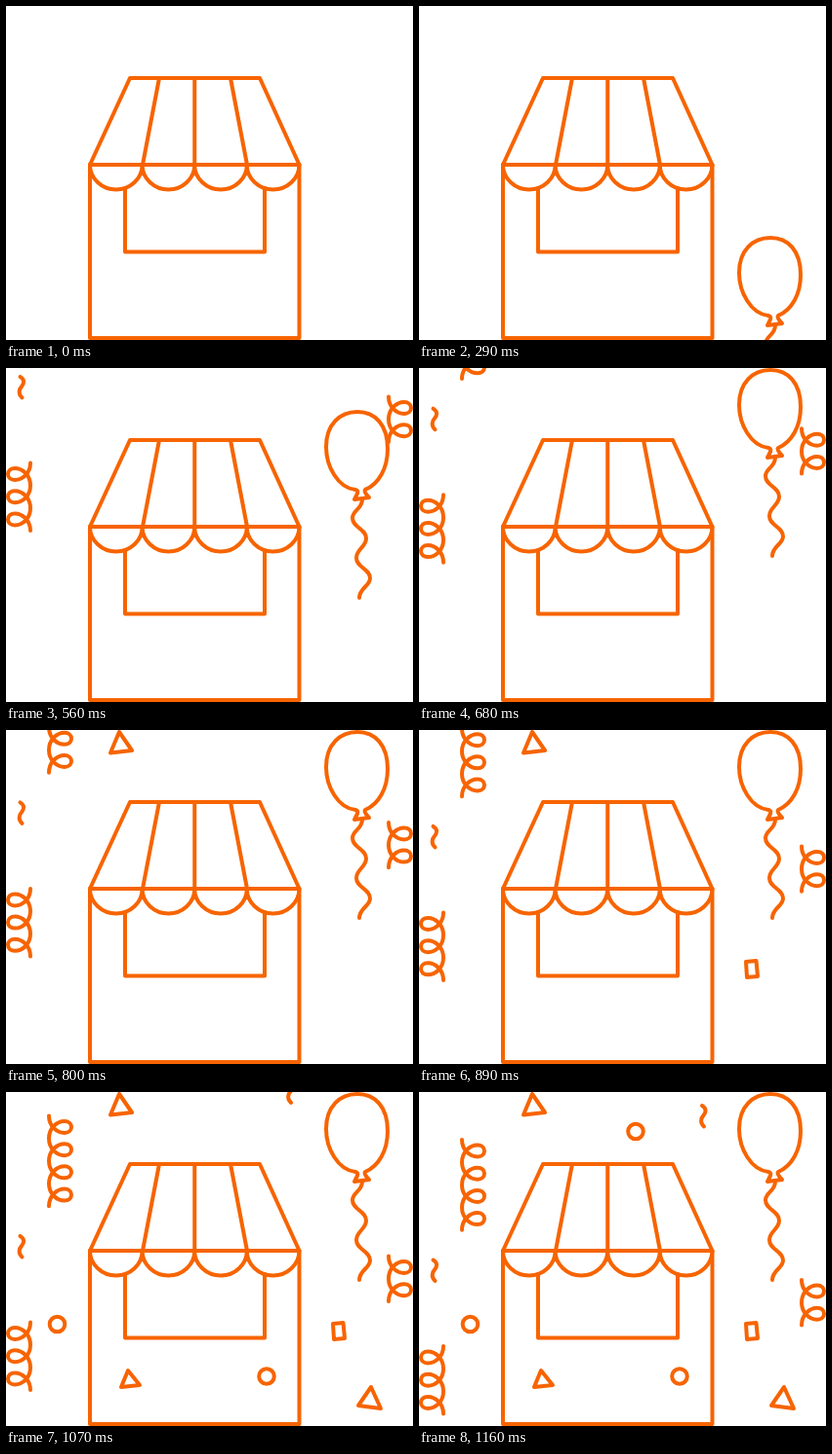
Recreate the animation shown at these times as an HTML page. Size 417x343 px, loop 1.49 s.

```html
<!DOCTYPE html>
<html lang="en">
<head>
<meta charset="utf-8">
<title>Market stall party</title>
<style>
  html, body { margin: 0; width: 100%; height: 100%; overflow: hidden; background: #fff; }
  svg { display: block; fill: none; stroke: #f76400; stroke-width: 4; stroke-linecap: round; stroke-linejoin: round; }
</style>
</head>
<body>
<svg width="417" height="343" viewBox="0 0 417 343">
  <g id="stall">
    <path d="M86 163V341H300.500V163M122 187V252.500H265V187"/>
    <path d="M127 74H260L300.500 163H86ZM157 74L140 163M193.250 74V163M230 74L247 163"/>
    <path d="M86 163a26.800 25.500 0 0 0 53.600 0a26.800 25.500 0 0 0 53.600 0a26.800 25.500 0 0 0 53.600 0a26.800 25.500 0 0 0 53.600 0"/>
  </g>
  <g id="balloon">
    <path d="M358 82C340 80 328 58 328 38C328 15 342 2 360 2C378 2 391 15 391 40C391 60 382 76 368 82Q366 84 372 90L357 92L360 86Q361 83 358 82"/>
    <path d="M365 92C365 102 355 103 355 111C355 121 369 122 369 132C369 141 359 143 359 152C359 162 373 163 373 173C373 181 362 183 362 193"/>
  </g>
  <g id="streamers"></g>
  <g id="confetti">
    <path data-at="770" d="M116 2L129 21L107 23.500Z"/>
    <path data-at="830" d="M335 238L345.500 237L347 253L336 254Z"/>
    <path data-at="920" d="M125 286L137 301L118 303Z"/>
    <path data-at="950" d="M374 303L384 325L361 322Z"/>
    <circle data-at="1040" cx="52.500" cy="238.500" r="7.800"/>
    <circle data-at="1070" cx="267" cy="292" r="7.800"/>
    <circle data-at="1100" cx="222" cy="40.500" r="7.800"/>
  </g>
</svg>
<script>
const LOOP = 1490, START = 170, STEP = 30, BALLOON_END = 680, END = 1160;
const FALL_SPEED = 0.2725;
const $ = id => document.getElementById(id);

// A curl of n loops; side is 1 for loops to the right, -1 to the left.
function curl(x, y, side, n) {
  const loop = `c0 10.5 ${8 * side} 17.5 ${16 * side} 17.5` +
    `c${4 * side} 0 ${7 * side} -2.5 ${7 * side} -6` +
    `s${-3 * side} -6 ${-7 * side} -6` +
    `c${-8 * side} 0 ${-16 * side} 7.2 ${-16 * side} 17.7`;
  return `M${x} ${y}` + loop.repeat(n);
}

const squiggle = (x, y) => `M${x} ${y}c5 3 4 7 1.5 10c-3 3 -3.500 8 .5 11.500`;

function addStreamer(d, at = START) {
  $('streamers').insertAdjacentHTML('beforeend', `<path data-at="${at}" d="${d}"/>`);
}

addStreamer(curl(25, 261, -1, 3), 380);
addStreamer(curl(392, 193, 1, 2), 410);
addStreamer(curl(44, 49, 1, 4));
addStreamer(squiggle(14.5, 172.5));
addStreamer(squiggle(290, 14));

const timed = document.querySelectorAll('[data-at]');
const shift = (id, y) => $(id).setAttribute('transform', `translate(0 ${y})`);

function draw(now) {
  const time = now % LOOP;
  const t = time < START ? 0 : Math.min(END, START + Math.floor((time - START) / STEP) * STEP);

  // Decelerating rise from below the stage
  const u = Math.max(0, (BALLOON_END - t) / (BALLOON_END - START));
  shift('balloon', t ? u * (101 + u * (380 - 142 * u)) : 400);
  shift('streamers', -FALL_SPEED * (END - t));

  for (const el of timed) el.style.display = t >= +el.dataset.at ? '' : 'none';
}

const begin = performance.now();
function tick() {
  draw(performance.now() - begin);
  requestAnimationFrame(tick);
}
tick();
</script>
</body>
</html>
```
